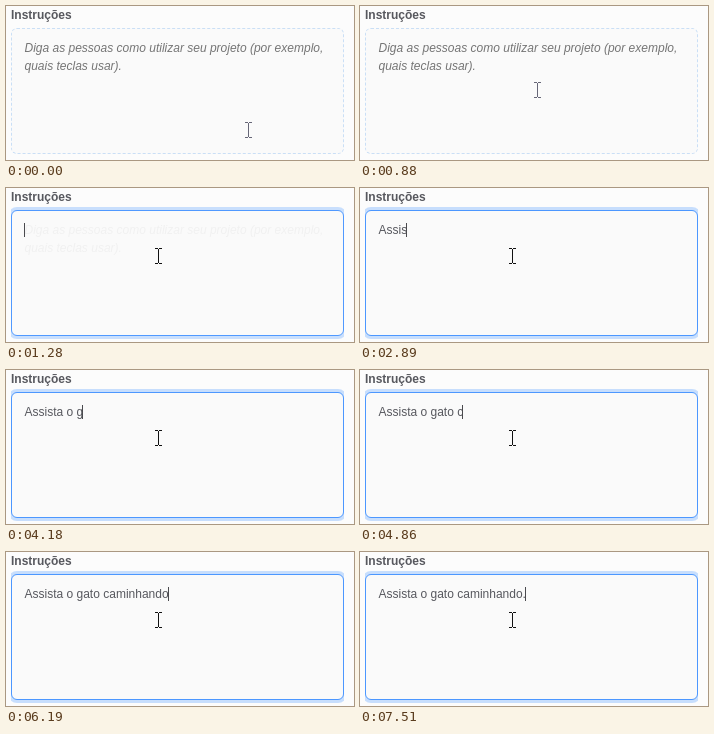
Recreate the animation shown at these times as an HTML page. Size 348x154 px, loop 7970 ms.

```html
<!DOCTYPE html>
<html lang="pt">
<head>
<meta charset="utf-8">
<style>
  html, body { margin: 0; width: 100%; height: 100%; overflow: hidden; background: #fcfcfc; }
  body { font: 12px/18px "Liberation Sans", Arial, sans-serif; color: #57585e; }
  body > * { position: absolute; white-space: pre; }
  #title { left: 5px; top: 2px; font-weight: bold; line-height: 14px; }
  #box {
    left: 5px; top: 22px; width: 333px; height: 126px; box-sizing: border-box;
    background: #fafafa; border: 1px solid; border-radius: 6px; clip-path: inset(-4px 0);
  }
  #hint, #typed { left: 18.5px; top: 33px; }
  #hint { font-style: italic; color: #757575; }
  #caret { top: 35px; width: 1px; height: 14px; background: #4a4a4e; }
  #mouse { left: 0; top: 0; }
</style>
</head>
<body>
<div id="title">Instruções</div>
<div id="box"></div>
<div id="hint">Diga as pessoas como utilizar seu projeto (por exemplo,
quais teclas usar).</div>
<div id="typed"></div>
<div id="caret"></div>
<svg id="mouse" width="7" height="16" fill="none" stroke="currentColor" shape-rendering="crispEdges">
  <path d="M0 .5H3M4 .5H7M3.5 1V15M0 15.5H3M4 15.5H7"/>
</svg>
<script>
const [box, hint, typed, caret, mouse] =
  ['box', 'hint', 'typed', 'caret', 'mouse'].map(id => document.getElementById(id));
const LOOP = 7970, FOCUS = 1100, BLINK = 530;
const text = 'Assista o gato caminhando.';
const keys = [2090, 2490, 2620, 2820, 2890, 3110, 3240, 3440, 3850, 3920, 4180, 4250, 4520,
  4590, 4660, 4860, 4930, 5060, 5260, 5460, 5660, 5730, 5860, 6060, 6190, 6450];
// The pointer and the focus fade advance in visible steps
const ticks = [0, ...Array.from({ length: 10 }, (_, i) => 460 + i * 690 / 9), 1210, 1280, 1350];

const span = (t, a, b) => Math.min(1, Math.max(0, (t - a) / (b - a)));
const smooth = p => p * p * (3 - 2 * p);
const mix = (a, b, p) => a + (b - a) * p;

function draw(t) {
  const held = ticks.findLast(k => k <= t + .5);
  const p = span(held, 1080, 1320), focused = p > 0;

  const move = smooth(span(held, 410, 1075));
  mouse.style.transform =
    `translate(${Math.round(mix(239, 149, move))}px, ${Math.round(mix(116, 60, move))}px)`;
  mouse.style.color = focused ? '#111' : '#667';

  const fade = 1 - (1 - p) ** 2;
  const rgb = [[202, 76], [223, 151], [246, 255]].map(([a, b]) => Math.round(mix(a, b, fade)));
  box.style.borderStyle = focused ? 'solid' : 'dashed';
  box.style.borderColor = `rgb(${rgb})`;
  box.style.boxShadow = `0 0 0 ${Math.ceil(3 * p * p)}px rgba(76, 151, 255, ${.3 * fade})`;
  hint.style.opacity = (1 - p) ** 1.5;

  const count = keys.filter(k => k <= t).length;
  const shown = text.slice(0, count);
  if (typed.textContent !== shown) typed.textContent = shown;
  const idle = t - (count ? keys[count - 1] : FOCUS);
  const on = focused && Math.floor(Math.max(0, idle) / BLINK) % 2 === 0;
  caret.style.visibility = on ? 'visible' : 'hidden';
  caret.style.left = Math.floor(18 + typed.getBoundingClientRect().width) + 'px';
}

const start = performance.now();
function frame() {
  draw((performance.now() - start) % LOOP);
  requestAnimationFrame(frame);
}
frame();
</script>
</body>
</html>
```
